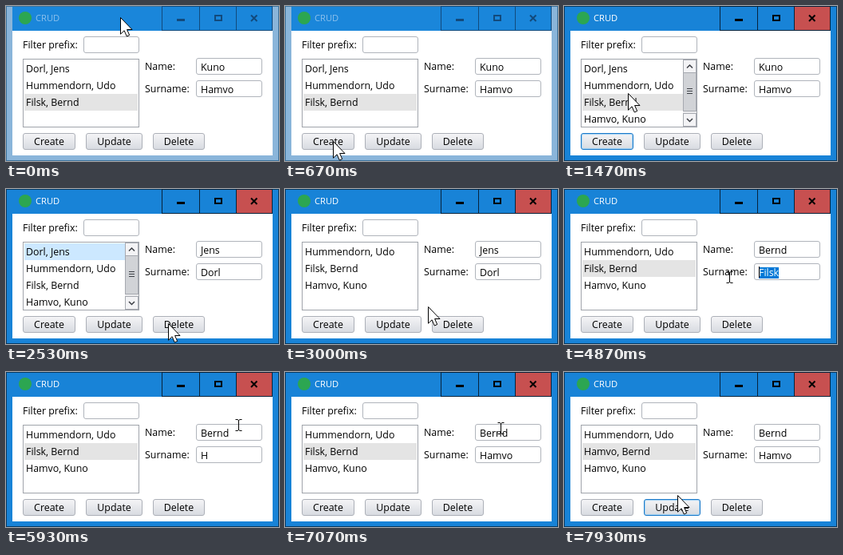
An HTML page for the animation above (8000 ms loop, 342 by 194 pixels).

```html
<!DOCTYPE html>
<html lang="en">
<head>
<meta charset="utf-8">
<title>CRUD</title>
<style>
html, body { margin: 0; width: 100%; height: 100%; overflow: hidden; }
#win {
  position: relative; width: 342px; height: 194px; overflow: hidden;
  background: #1883d7; color: #000; --line: #08233b; --icon: #000;
  font: 12.4px/14px "Open Sans", "Noto Sans", sans-serif;
}
#win.idle { background: #8ab5da; --line: #124a7c; --icon: #124a7c; }
#win div, #win svg { position: absolute; box-sizing: border-box; white-space: pre; }
#strip { left: 8px; top: 0; width: 326px; height: 31px; background: #1883d7; }
.idle #strip { background: #1a86da; }
#edge { inset: 0; border: 1px solid #0b3a60; }
.idle #edge { border-color: #3f739c; }
#body { left: 8px; top: 31px; width: 326px; height: 156px; background: #fff; }
#title { left: 37px; top: 8px; font-size: 11.2px; color: #fff; }
.idle #title { color: #8cc0ec; }
#logo { left: 16px; top: 7px; width: 16px; height: 16px; border-radius: 50%; background: #2ca651; }
.cap { top: 0; height: 31px; border: 1px solid var(--line); }
.cap.close { background: #c75050; }
.idle .cap { background: none; }
#icons { stroke: var(--icon); }
.field { height: 21px; border: 1px solid #b0b4bb; border-radius: 3px; background: #fff; }
#list { left: 21px; top: 66px; width: 146px; height: 86px; border: 1px solid #a0a4ab; background: #fff; }
#mark { left: 23px; height: 21px; }
.btn {
  top: 159px; height: 21px; border: 1px solid #acb0b8; border-radius: 3px;
  background: linear-gradient(#f4f4f6, #d8dbe1); text-align: center; line-height: 19px;
}
.btn.focus { border-color: #1878c8; box-shadow: inset 0 0 1px 1px #a4d2f4; }
.btn.down { background: linear-gradient(#ccd2da, #dde1e7); }
.sel { display: inline-block; background: #0078d7; color: #fff; }
#caret { left: 244px; top: 97px; width: 1px; height: 14px; background: #000; }
svg { overflow: visible; }
</style>
</head>
<body>
<div id="win"></div>
<script>
const LOOP = 8000, STEP = 1000 / 15;
const win = document.getElementById('win');

function add(attrs, css = {}, text = '') {
  const el = document.createElement('div');
  Object.assign(el, attrs);
  for (const k in css) el.style[k] = typeof css[k] === 'number' ? css[k] + 'px' : css[k];
  el.textContent = text;
  return win.appendChild(el);
}
const label = (left, base, text = '') => add({}, { left, top: base - 12 }, text);
const field = (left, top, width) => add({ className: 'field' }, { left, top, width });
function drawing(id, markup) {
  win.insertAdjacentHTML('beforeend', `<svg id="${id}" width="1" height="1" style="left:0;top:0">${markup}</svg>`);
  return win.lastElementChild;
}
const show = (el, on) => { el.style.visibility = on ? 'visible' : 'hidden'; };

// Window frame
add({ id: 'strip' });
add({ id: 'edge' });
add({ id: 'body' });
add({ id: 'logo' });
add({ id: 'title' }, {}, 'CRUD');
add({ className: 'cap' }, { left: 195, width: 48 });
add({ className: 'cap' }, { left: 242, width: 47 });
add({ className: 'cap close' }, { left: 288, width: 46 });
drawing('icons', `<g fill="none">
  <path d="M214 17.500h10" stroke-width="3"/>
  <path d="M262 12h8v6h-8z" stroke-width="2"/>
  <path d="M307 11.500l7.500 7.500m0-7.500l-7.500 7.500" stroke-width="2"/></g>`);

// Form
label(21, 54, 'Filter prefix:');
label(174, 81, 'Name:');
label(174, 109, 'Surname:');
field(97, 38, 70);
field(238, 65, 83);
field(238, 93, 83);
const first = label(244, 82), last = label(244, 110);
const caret = add({ id: 'caret' });
add({ id: 'list' });
const mark = add({ id: 'mark' });
const rows = [84, 105, 126, 147].map(y => label(25, y));
const bar = drawing('bar', `
  <rect x="149" y="67" width="17" height="84" fill="#ececee"/>
  <g fill="#f3f3f5" stroke="#a6a9b0">
    <rect x="149.500" y="67.500" width="16" height="16"/>
    <rect x="149.500" y="134.500" width="16" height="16"/>
    <rect x="149.500" y="83.500" width="16" height="48" fill="#d1d3d7"/></g>
  <g fill="none" stroke="#3c3f45" stroke-width="1.500">
    <path d="M154 77.500l3.500-3.500 3.500 3.500M154 141l3.500 3.500 3.500-3.500"/>
    <path d="M154 103.500h7m-7 3h7m-7 3h7" stroke-width="1"/></g>`);

// Buttons: pressed, released, focus lost
const buttons = [
  ['Create', 21, 66, 1000, 1270, 2000],
  ['Update', 100, 71, 7600, 7670, LOOP],
  ['Delete', 184, 65, 2670, 2800, 2930]
].map(([text, left, width, down, up, blur]) =>
  ({ el: add({ className: 'btn' }, { left, width }, text), down, up, blur }));

// Pointers
const arrow = drawing('arrow', '<path d="M.5.5V21.200l4.600-4.400 3.200 7.200 3.400-1.500-3.100-7h6.400z" fill="#fff" stroke="#000"/>');
const beam = drawing('beam', '<path d="M-3.500-6.500h2.500l1.500 1 1.500-1h2.500M.5-5.500V6.500M-3.500 7.500h2.500l1.500-1 1.500 1h2.500" fill="none" stroke="#000"/>');

// Pointer path: time, x, y
const path = [
  [0, 143, 14], [330, 100, 98], [670, 60, 169], [1200, 60, 169], [1470, 80, 109],
  [1930, 100, 80], [2070, 100, 80], [2530, 203, 168], [2600, 204, 168], [2800, 204, 168],
  [2930, 192, 154], [3470, 95, 103], [3600, 95, 103], [3670, 105, 99], [3800, 150, 73],
  [4130, 235, 115], [4470, 304, 104], [4530, 304, 105], [4870, 207, 110], [4930, 214, 113],
  [5070, 265, 121], [5170, 315, 117], [5270, 291, 66], [7000, 291, 66], [7070, 270, 70],
  [7400, 185, 130], [7670, 135, 167], [7870, 135, 167], [7930, 142, 154], [LOOP, 142, 154]
];

function slope(i, axis) {
  const a = path[i - 1], b = path[i], c = path[i + 1];
  if (!a || !c || (b[axis] - a[axis]) * (c[axis] - b[axis]) <= 0) return 0;
  return (c[axis] - a[axis]) / (c[0] - a[0]);
}

function pointer(t) {
  let i = 0;
  while (i < path.length - 2 && t >= path[i + 1][0]) i++;
  const a = path[i], b = path[i + 1], d = b[0] - a[0], u = (t - a[0]) / d;
  const s = u * u * (3 - 2 * u);
  return [1, 2].map(n => Math.round(a[n] + (b[n] - a[n]) * s
    + d * (slope(i, n) * u * (1 - u) ** 2 - slope(i + 1, n) * u * u * (1 - u))));
}

// Latest entry whose time has come
const at = (steps, t) => steps.filter(s => s[0] <= t).pop().slice(1);

const A = 'Dorl, Jens', B = 'Hummendorn, Udo', C = 'Filsk, Bernd', D = 'Hamvo, Kuno';
const GREY = '#e4e4e4', BLUE = '#cce8ff';
const listSteps = [
  [0, [A, B, C], 2, GREY],
  [1270, [A, B, C, D], 2, GREY],
  [2000, [A, B, C, D], 0, BLUE],
  [2670, [A, B, C, D], 0, GREY],
  [2800, [B, C, D], 0, 'transparent'],
  [3400, [B, C, D], 1, BLUE],
  [4530, [B, C, D], 1, GREY],
  [7670, [B, 'Hamvo, Bernd', D], 1, GREY]
];
const formSteps = [
  [0, 'Kuno', 'Hamvo'], [2000, 'Jens', 'Dorl'], [3400, 'Bernd', 'Filsk'],
  ...[5930, 6070, 6130, 6330, 6600].map((t, i) => [t, 'Bernd', 'Hamvo'.slice(0, i + 1)])
];

function inField(x, y) {
  return x > 238 && x < 321 && ((y > 65 && y < 86) || (y > 93 && y < 114));
}

function setSurname(text, t, x) {
  if (t < 4530 || t >= 5930) { last.textContent = text; return; }
  const from = t < 4870 ? Math.max(0, Math.min(text.length, Math.round((x - 244) / 5.8))) : 0;
  const sel = document.createElement('span');
  sel.className = 'sel';
  sel.textContent = text.slice(from);
  last.replaceChildren(text.slice(0, from), sel);
}

function render(t) {
  const [x, y] = pointer(t);
  win.className = t < 1000 ? 'idle' : '';

  const [items, chosen, tint] = at(listSteps, t);
  rows.forEach((r, i) => { r.textContent = items[i] || ''; });
  const full = items.length > 3;
  show(bar, full);
  mark.style.top = 68 + 21 * chosen + 'px';
  mark.style.width = (full ? 126 : 142) + 'px';
  mark.style.background = tint;

  const [name, surname] = at(formSteps, t);
  first.textContent = name;
  setSurname(surname, t, x);
  show(caret, t >= 4800 && t < 5470);

  for (const b of buttons) {
    b.el.classList.toggle('down', t >= b.down && t < b.up);
    b.el.classList.toggle('focus', t >= b.down && t < b.blur);
  }

  const text = inField(x, y) || (t >= 4530 && t <= 4870);
  show(arrow, !text);
  show(beam, text);
  (text ? beam : arrow).style.transform = `translate(${x}px, ${y}px)`;
}

const start = performance.now();
function tick() {
  const t = (performance.now() - start) % LOOP;
  const k = Math.floor((t + 3.4) / STEP) % 120;
  render(Math.round(k * STEP / 10) * 10);
  requestAnimationFrame(tick);
}
render(0);
requestAnimationFrame(tick);
</script>
</body>
</html>
```
